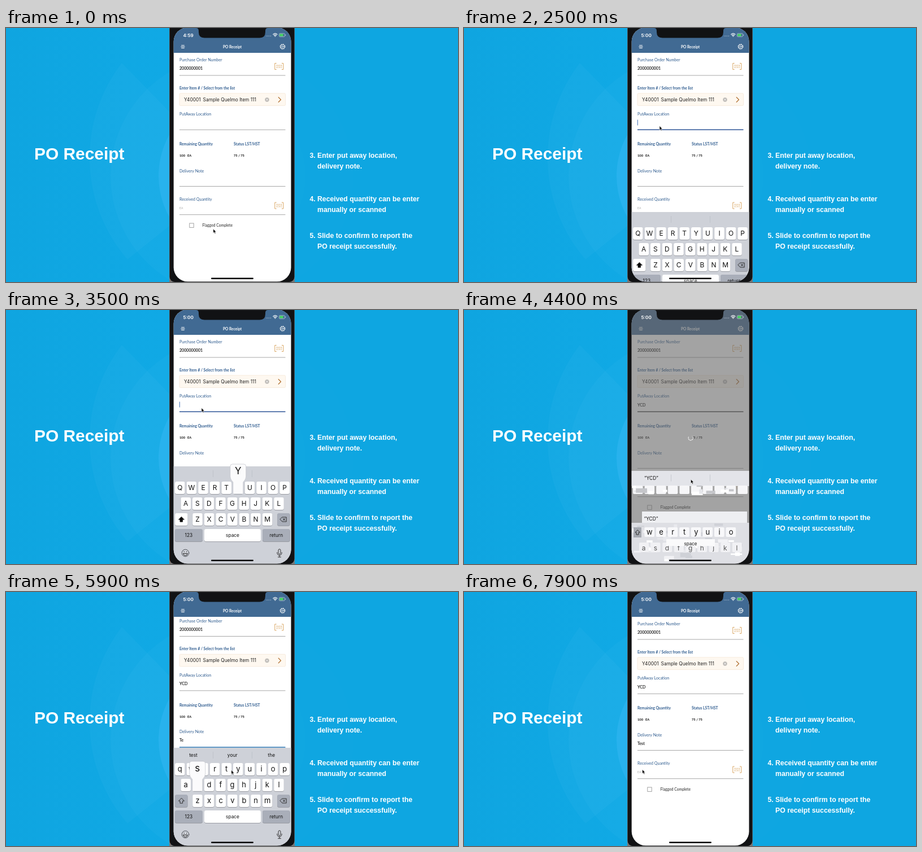
Recreate the animation shown at these times as an HTML page. Size 800 px wide and 450 px high, loop 8 s.

```html
<!DOCTYPE html>
<html lang="en">
<head>
<meta charset="utf-8">
<title>PO Receipt</title>
<style>
  html, body { margin: 0; width: 100%; height: 100%; overflow: hidden; background: #10a6e1; }
  svg { display: block; width: 100vw; height: 100vh; }
  .side { font-family: "Liberation Sans", Arial, sans-serif; font-weight: 700; fill: #fff; }
  .title { font-size: 29.9px; }
  .steps { font-size: 12.27px; }
  .app { font-family: Lato, sans-serif; font-size: 7.1px; }
  .label { fill: #2f5c8f; }
  .strong { font-size: 6.65px; font-weight: 700; }
  .value { fill: #111; stroke: #111; stroke-width: .12; }
  .amount { font-size: 5.8px; font-weight: 700; fill: #111; }
  .ui { font-family: Inter, sans-serif; }
  .mid { text-anchor: middle; }
  .line { stroke: #a8a8a8; stroke-width: 1; }
  .icon { fill: none; stroke-linecap: round; stroke-linejoin: round; }
</style>
</head>
<body>
<svg viewBox="0 0 800 450" preserveAspectRatio="none">
  <defs>
    <linearGradient id="sky">
      <stop offset="0" stop-color="#0fa5e0"/>
      <stop offset=".35" stop-color="#10a9e5"/>
      <stop offset="1" stop-color="#0fa5e0"/>
    </linearGradient>
    <clipPath id="screen"><rect x="296.7" y="-1" width="207.8" height="450.3" rx="25"/></clipPath>
    <g id="scan" class="icon" stroke="#d9a663" stroke-width="1">
      <path d="M-5-5.5H-7.5V5.5H-5M5-5.5H7.5V5.5H5"/>
      <path d="M-4-2.6V-.8M-4 1V2.6M-1.4-2.6V0M-1.4 1.6V2.6M1.3-2.6V-1M1.3 .6V2.6M4-2.6V0M4 1.6V2.6" stroke-width=".9"/>
    </g>
  </defs>

  <rect width="800" height="450" fill="url(#sky)"/>
  <path d="M205 62A275 275 0 0 0 215 410L400 262Z" fill="#fff" opacity=".022"/>
  <circle cx="400" cy="262" r="215" fill="#fff" opacity=".018"/>
  <ellipse cx="400" cy="262" rx="130" ry="140" fill="#2db5ef" opacity=".75"/>
  <rect x="511" width="289" height="450" fill="#0fa6e1" opacity=".92"/>

  <text class="side title" x="50" y="233">PO Receipt</text>
  <g class="side steps">
    <text x="537.5" y="230">3.</text>
    <text x="551" y="230">Enter put away location,</text>
    <text x="551" y="248.7">delivery note.</text>
    <text x="537.5" y="306.7">4.</text>
    <text x="551" y="306.7">Received quantity can be enter</text>
    <text x="551" y="325.6">manually or scanned</text>
    <text x="537.5" y="372">5.</text>
    <text x="551" y="372">Slide to confirm to report the</text>
    <text x="551" y="390.7">PO receipt successfully.</text>
  </g>

  <rect x="289" y="0" width="222" height="450" fill="#777"/>
  <rect x="289.6" y="-30" width="220.8" height="480" rx="9" fill="#111214"/>

  <g clip-path="url(#screen)">
    <rect x="296" y="-1" width="209" height="452" fill="#fff"/>
    <g id="form" class="app">
      <text class="label" x="307" y="59">Purchase Order Number</text>
      <text class="value" x="307" y="74">2000000001</text>
      <use href="#scan" x="483.3" y="68"/>
      <path class="line" d="M307 84H494.5"/>

      <text class="label strong" x="307" y="108.8">Enter Item # / Select from the list</text>
      <rect x="307" y="115.8" width="187.5" height="21.6" rx="1.5" fill="#fef8f0" stroke="#f5e8d8" stroke-width=".8"/>
      <g class="ui" font-size="8.35" fill="#222">
        <text x="315" y="129.6">Y40001</text>
        <text x="348.6" y="129.6">Sample Quelmo Item 111</text>
      </g>
      <circle cx="462" cy="127" r="3.7" fill="#bdbab6"/>
      <path class="icon" d="M460.6 125.6l2.8 2.8m0-2.8l-2.8 2.8" stroke="#fff" stroke-width=".8"/>
      <path class="icon" d="M482.3 122.7l4.2 4.3-4.2 4.3" stroke="#b5763a" stroke-width="1.3"/>

      <text class="label" x="307" y="155.4">PutAway Location</text>
      <text id="place" class="value" x="307" y="170.5"></text>
      <path id="placeLine" class="line" d="M307 180.3H494.5"/>

      <text class="label strong" x="307" y="208.4">Remaining Quantity</text>
      <text class="label strong" x="403" y="208.4">Status LST/HST</text>
      <text class="amount" x="307" y="228.1">100</text>
      <text class="amount" x="321" y="228.1">EA</text>
      <text class="amount" x="403" y="228.1">75 / 75</text>

      <text class="label" x="307" y="255.5">Delivery Note</text>
      <text id="note" class="value" x="307" y="270.5"></text>
      <path id="noteLine" class="line" d="M307 280.5H494.5"/>

      <text class="label" x="307" y="305.5">Received Quantity</text>
      <text x="307" y="320.6" font-size="5" fill="#aaa">EA</text>
      <use href="#scan" x="483.3" y="314.6"/>
      <path class="line" d="M307 330.7H494.5"/>
      <rect x="324.8" y="346" width="7.4" height="7.4" fill="#fff" stroke="#999" stroke-width=".9"/>
      <text x="347.6" y="352.2" font-size="6.75" fill="#222">Flagged Complete</text>
      <rect id="caret" width="1" height="10" fill="#3d6db5"/>
    </g>

    <rect x="296" y="-1" width="209" height="45" fill="#416a93"/>
    <path class="icon" d="M310.6 30.8h4.8M309.8 33.2h6.4M310.6 35.6h4.8" stroke="#fff" stroke-width="1"/>
    <text class="app mid" x="400.6" y="36.1" font-size="6.6" style="font-size:6.65px;font-weight:700" fill="#fff">PO Receipt</text>
    <g class="icon" stroke="#fff">
      <circle cx="489.5" cy="33" r="3.7" stroke-width="1"/>
      <circle cx="489.5" cy="33" r="1.5" stroke-width=".8"/>
      <circle cx="489.5" cy="33" r="4.5" stroke-width="1" stroke-dasharray="1.7 1.83" stroke-linecap="butt"/>
    </g>

    <g id="busy">
      <rect x="296" y="-1" width="209" height="452" fill="#666" opacity=".6"/>
      <path class="icon" d="M397.5 225a4 4 0 1 0 6.5-1" stroke="#e4e4e4" stroke-width="1.3" stroke-dasharray="2 1.4"/>
    </g>
    <g id="keys" class="ui mid"></g>
    <g id="broken" class="ui mid"></g>
    <rect x="363" y="442.6" width="75" height="2.3" rx="1.1" fill="#000"/>
  </g>

  <path d="M336 0Q341 0 341 5V7Q341 17.5 351 17.5H449Q459 17.5 459 7V5Q459 0 464 0Z" fill="#111214"/>
  <text id="clock" class="ui" x="313.4" y="15.6" font-size="8.2" font-weight="600" fill="#fff"></text>
  <path d="M460.5 14.2h9" stroke="#cbd6e2" stroke-width="1" stroke-dasharray="1 1.5"/>
  <g class="icon" stroke="#fff" stroke-width="1.2">
    <path d="M472.9 11.3q3.5-3.2 7 0M474.4 13q2-1.7 4 0"/>
    <circle cx="476.4" cy="14.6" r=".4"/>
  </g>
  <rect x="483.4" y="9.7" width="10" height="5.8" rx="1.5" fill="none" stroke="#c4d0dd" stroke-width=".7"/>
  <rect x="484.3" y="10.6" width="6.4" height="4" rx=".8" fill="#4cd964"/>
  <path d="M494.7 11.6v2" stroke="#c4d0dd" stroke-width=".9"/>

  <path id="pointer" d="M0 0V7.2L1.7 5.7 2.9 8.4 4.2 7.8 3.1 5.2H5.2Z" fill="#000" stroke="#fff" stroke-width=".6"/>
</svg>

<script>
const LOOP = 8000, STEP = 100;
const ROWS = ["QWERTYUIOP", "ASDFGHJKL", "ZXCVBNM"];
const ROW_X = [307.8, 318.2, 339];
const PITCH = 20.6, ROW_H = 28;
const GREY = "#a9aeb9";
const $ = id => document.getElementById(id);

// Each track is a list of [time, value], eased or linear between neighbours.
const POINTER_X = [[600, 366.8], [1400, 366.5], [2200, 346], [3900, 346], [4300, 401.4], [4700, 401.4],
  [5100, 398.8], [6000, 398.8], [6700, 478.8], [6900, 478.8], [7700, 315.6]];
const POINTER_Y = [[600, 356], [1400, 310], [2200, 173.5], [3900, 173.5], [4300, 300], [4700, 300],
  [5100, 315.5], [6000, 315.5], [6700, 400], [6900, 400], [7700, 314.5]];
const KEYBOARD_Y = [[2300, 174], [2400, 110], [2500, 50], [2600, 18], [2700, 5], [2800, 1], [4200, 1],
  [4600, 174], [4700, 110], [4800, 45], [4900, 12], [5000, 0], [6900, 0],
  [7000, 34], [7100, 95], [7200, 150], [7300, 174]];
const SCROLL = [[4700, 0], [5000, -5.5], [6900, -5.5], [7300, 0]];

const PLACE = [[3400, "Y"], [3700, "C"], [3900, "D"]];
const NOTE = [[5300, "T"], [5600, "e"], [5800, "s"], [6000, "t"]];

const smooth = p => p * p * (3 - 2 * p);
function track(points, t, ease = p => p) {
  if (t <= points[0][0]) return points[0][1];
  for (let i = 1; i < points.length; i++) {
    const [a, from] = points[i - 1], [b, to] = points[i];
    if (t <= b) return from + (to - from) * ease((t - a) / (b - a));
  }
  return points.at(-1)[1];
}
const within = (t, a, b) => t >= a && t < b;
const typed = (strokes, t) => strokes.filter(([at]) => t >= at + 200).map(([, c]) => c).join("");

const rect = (x, y, w, h, fill, r = 0) =>
  `<rect x="${x}" y="${y}" width="${w}" height="${h}" rx="${r}" fill="${fill}"/>`;
const text = (x, y, size, s, fill = "#111") =>
  `<text x="${x}" y="${y}" font-size="${size}" fill="${fill}">${s}</text>`;
const key = (cx, cy, w, fill = "#fff") =>
  rect(cx - w / 2, cy - 10.2, w, 22, "#898c92", 3) + rect(cx - w / 2, cy - 11, w, 22, fill, 3);
const icon = (d, width = 1, fill = "none") =>
  `<path class="icon" d="${d}" stroke="#222" stroke-width="${width}" style="fill:${fill}"/>`;

function suggestions(words, y) {
  const bars = [366, 435].map(x => rect(x, y - 6, .7, 12, "#b9bdc5")).join("");
  return bars + words.map((w, i) => text(331.5 + 69.2 * i, y + 3, 8.4, w)).join("");
}

function popup(letter, upper) {
  const row = ROWS.findIndex(r => r.includes(letter.toUpperCase()));
  const x = ROW_X[row] + PITCH * ROWS[row].indexOf(letter.toUpperCase());
  const y = 314 + ROW_H * row;
  return `<path d="M${x - 9} ${y + 11}V${y - 10}Q${x - 14} ${y - 15} ${x - 14} ${y - 20}V${y - 38}
    Q${x - 14} ${y - 42} ${x - 10} ${y - 42}H${x + 10}Q${x + 14} ${y - 42} ${x + 14} ${y - 38}
    V${y - 20}Q${x + 14} ${y - 15} ${x + 9} ${y - 10}V${y + 11}Z" fill="#fbfbfc" stroke="#b9bcc3" stroke-width=".6"/>`
    + text(x, y - 24, 17, letter);
}

function keyboard(upper, words, pressed) {
  let out = rect(296, 276, 209, 176, "#ced1d8") + suggestions(words, 289);
  ROWS.forEach((row, r) => [...row].forEach((c, i) => {
    const x = ROW_X[r] + PITCH * i, y = 314 + ROW_H * r;
    out += key(x, y, 17.6) + text(x, y + (upper ? 4.3 : 3.6), upper ? 12 : 13, upper ? c : c.toLowerCase());
  }));
  out += key(310.3, 370, 22.4, upper ? "#fff" : GREY)
    + icon("M310.3 365.4l-4.8 4.8h2.5v4h4.6v-4h2.5z", .9, upper ? "#000" : "none")
    + key(491.3, 370, 22.4, GREY)
    + icon("M489 366h7.2v8H489l-3.8-4zM490.4 368.2l3.4 3.6m0-3.6l-3.4 3.6", .9)
    + key(323.4, 398, 49, GREY) + text(323.4, 401, 8.3, "123")
    + key(401, 398, 100) + text(401, 401, 8.3, "space")
    + key(478.3, 398, 48.6, GREY) + text(478.3, 401, 8.3, "return")
    + `<circle class="icon" cx="317.5" cy="429.5" r="6.3" stroke="#4b4f56" stroke-width="1"/>`
    + icon("M313.6 430.4h7.8q-.7 3.7-3.9 3.7t-3.9-3.7M315.3 427v.7M319.7 427v.7")
    + icon("M482 424.6a2 2 0 0 1 4 0v5a2 2 0 0 1-4 0zM479.8 428.5q0 5 4.2 5t4.2-5M484 433.5v3.2M481.5 436.7h5", .9);
  return out + (pressed ? popup(pressed) : "");
}

function random(seed) {
  return () => (seed = (seed * 16807) % 2147483647) / 2147483647;
}

// Torn remains of the keyboard while it is being dismissed.
function brokenKeyboard() {
  const rnd = random(77);
  const scatter = (n, y, h, fills) => Array.from({ length: n }, () =>
    rect(297 + rnd() * 200, y + rnd() * h, 4 + rnd() * 16, 2 + rnd() * 6, fills[Math.floor(rnd() * fills.length)])).join("");
  let out = rect(296, 285, 209, 27, "#e3e4e9") + suggestions(["“YCD”"], 297.5);
  for (let i = 0; i < 10; i++) out += rect(299 + PITCH * i, 311, 17.6, 15, "#f6f6f8", 2);
  out += scatter(14, 310, 12, ["#fff", "#e6e7eb", "#c5c6ca"])
    + rect(315, 357, 186, 28, "#eeeff2") + rect(296, 377, 209, 75, "#dedfe4")
    + text(331, 373, 8.4, "“YCD”") + scatter(38, 378, 62, ["#fff", "#f2f2f5", "#cfd1d7", "#e8e9ed"]);
  [..."wertyuio"].forEach((c, i) => {
    const x = 328.4 + PITCH * i;
    out += rect(x - 9, 385, 17.6, 17, "#f8f8fa", 2) + text(x, 397.5, 13, c);
  });
  [..."asdfghjkl"].forEach((c, i) => {
    out += rect(310 + PITCH * i, 412, 17, 17, "#f1f1f4", 2) + text(318.2 + PITCH * i, 426, 12, c, "#555");
  });
  return out + rect(358, 406, 86, 12, "#fafafb") + text(401, 417, 8, "space")
    + rect(300, 385, 14, 18, "#a6a9b0") + icon("M307 390l-4 4h2v4h4v-4h2z", .9);
}

function draw(t) {
  const place = typed(PLACE, t), note = typed(NOTE, t);
  const inPlace = within(t, 2400, 4200), inNote = within(t, 4700, 6800);
  const torn = within(t, 4300, 4600);
  const stroke = [...PLACE, ...NOTE].find(([at]) => within(t, at, at + 200));

  $("clock").textContent = t < 1000 ? "4:59" : "5:00";
  $("place").textContent = place;
  $("note").textContent = note;
  $("form").setAttribute("transform", `translate(0 ${track(SCROLL, t)})`);

  const focus = (id, on, color) => {
    $(id).style.stroke = on ? color : "";
    $(id).style.strokeWidth = on ? 1.4 : "";
  };
  focus("placeLine", within(t, 2400, 4700), t < 4200 ? "#2f5597" : "#444");
  focus("noteLine", inNote, "#2f78b5");

  const field = $(inPlace ? "place" : "note");
  const caret = $("caret");
  caret.setAttribute("x", 306.8 + (field.textContent ? field.getComputedTextLength() + .8 : 0));
  caret.setAttribute("y", inPlace ? 162.5 : 263);
  caret.style.display = (inPlace || inNote) && t % 1000 < 600 ? "" : "none";

  $("busy").style.display = within(t, 4200, 4700) ? "" : "none";
  $("broken").style.display = torn ? "" : "none";

  const y = track(KEYBOARD_Y, t);
  const upper = t < 4000 || within(t, 4600, 5500);
  const words = note ? ["test", "your", "the"] : place && t < 4600 ? [`“${place}”`] : [];
  const keys = $("keys");
  keys.style.display = y < 174 && !torn ? "" : "none";
  keys.setAttribute("transform", `translate(0 ${y})`);
  keys.innerHTML = keyboard(upper, words, stroke && stroke[1]);

  $("pointer").setAttribute("transform",
    `translate(${track(POINTER_X, t, smooth)} ${track(POINTER_Y, t, smooth)})`);
}

$("broken").innerHTML = brokenKeyboard();
const start = performance.now();
let shown = -1;
function tick() {
  const t = Math.floor(((performance.now() - start) % LOOP) / STEP) * STEP;
  if (t !== shown) draw(shown = t);
  requestAnimationFrame(tick);
}
tick();
</script>
</body>
</html>
```
